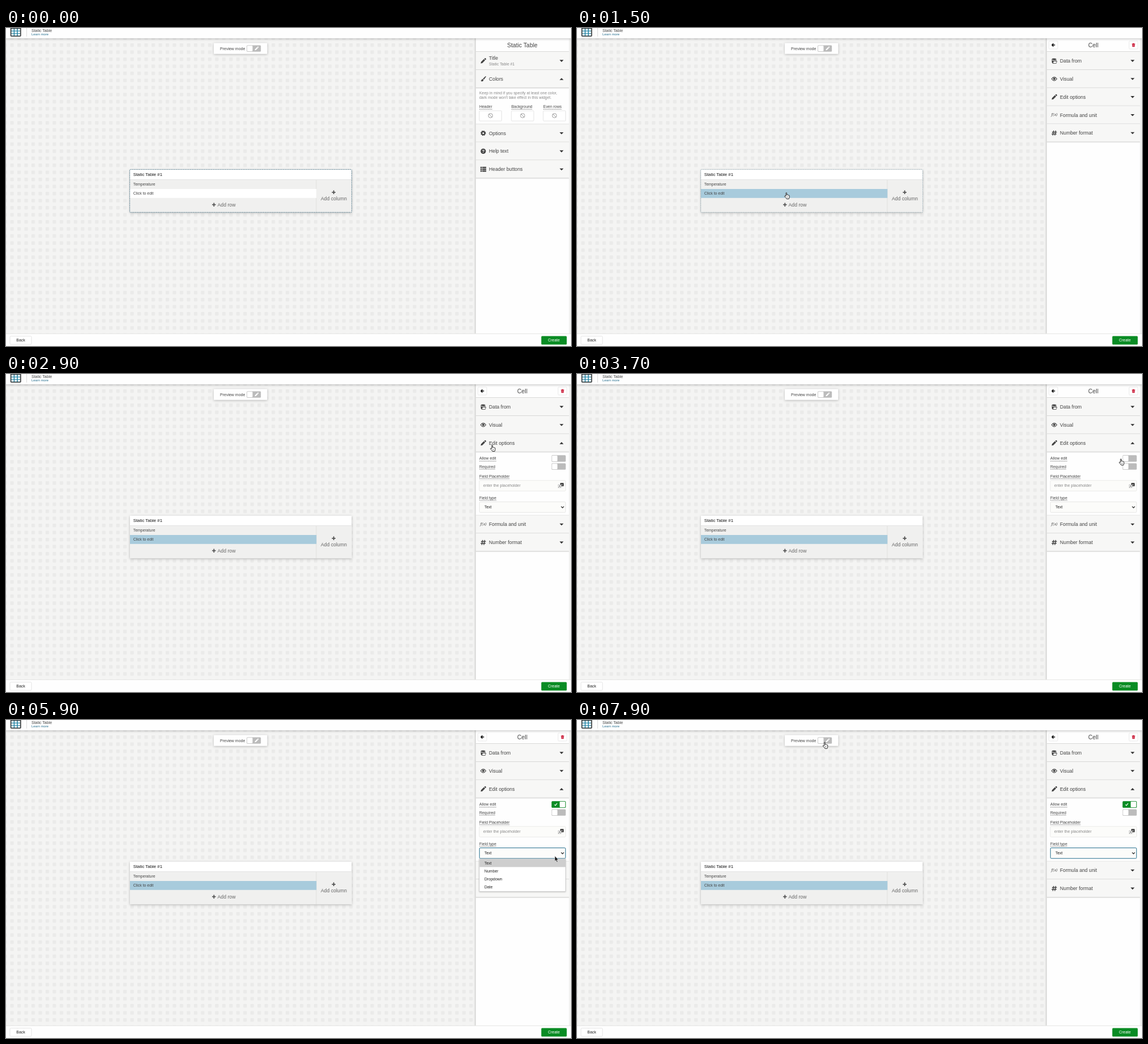
An HTML page that plays this animation: 998 px wide and 561 px high, repeating every 8 s.

```html
<!DOCTYPE html>
<html lang="en">
<head>
<meta charset="utf-8">
<title>Static Table editor</title>
<style>
  html, body { margin: 0; width: 100%; height: 100%; overflow: hidden; background: #fefefe; }
  svg { display: block; width: 998px; height: 561px; font-family: "Liberation Sans", Arial, sans-serif; }
  .lift { filter: drop-shadow(0 1px 2px rgba(0, 0, 0, .25)); }
  .soft { filter: drop-shadow(0 1px 1px rgba(0, 0, 0, .2)); }
</style>
</head>
<body>
<svg id="stage" viewBox="0 0 998 561" xmlns="http://www.w3.org/2000/svg"></svg>
<script>
const INK = '#444', GREEN = '#0a8c24', BLUE = '#246e8e', PANEL = '#f7f7f6', CELL = '#f0f0ef';
const SMALL = 6.95, MEDIUM = 8.73, SECTION = 31.85, TILE = 12.475;

const rect = (x, y, w, h, fill, extra = '') =>
  `<rect x="${x}" y="${y}" width="${w}" height="${h}" fill="${fill}" ${extra}/>`;
const text = (x, y, label, size = SMALL, fill = INK, extra = '') =>
  `<text x="${x}" y="${y}" font-size="${size}" fill="${fill}" ${extra}>${label}</text>`;
const path = (d, fill = INK, extra = '') => `<path d="${d}" fill="${fill}" ${extra}/>`;
const line = (d, color = INK, width = 1, extra = '') =>
  path(d, 'none', `stroke="${color}" stroke-width="${width}" ${extra}`);
const group = (id, body) => `<g id="${id}">${body}</g>`;
const at = (x, y, body) => `<g transform="translate(${x} ${y})">${body}</g>`;
const center = 'text-anchor="middle"';
const outlined = (color, radius = 1) => `stroke="${color}" stroke-width=".8" rx="${radius}"`;

// Icons are drawn around their own centre.
const pencil = color => path('M-4.5 4.5l.6-2.6 5-5 2.2 2.2-5 5zM1.8-3.7l1-1q.6-.4 1.2.1l.9.9q.5.6 0 1.2l-1 1z', color);
const plus = line('M-3.2 0H3.2M0-3.2V3.2', '#555', 1.8);
const icons = {
  pencil: pencil(INK),
  brush: path('M4.5-4.7q.7.3.2 1.2L1.2 1.2-.6-.3 3.5-4.4q.5-.5 1-.3zM-1.1.3L.6 1.8Q.3 4.6-2.3 4.4-4 4.4-4.6 2.7q1 .5 1.4-.5Q-2.6.3-1.1.3z'),
  gear: '<circle r="2.7" fill="none" stroke="#444" stroke-width="2.2"/>' +
    '<circle r="3.9" fill="none" stroke="#444" stroke-width="1.5" stroke-dasharray="1.6 1.463"/>',
  help: '<circle r="4.6" fill="#444"/>' + text(0, 2.9, '?', 8, '#fff', center + ' font-weight="bold"'),
  list: [-3.2, 0, 3.2].map(y => rect(-5, y - 1.2, 2.6, 2.4, INK) + rect(-1.7, y - 1.2, 6.9, 2.4, INK)).join(''),
  data: path('M-4.4-2.5q0-2 4-2t4.2 2v5q-.4 2-4 2t-4-2z') + line('M-4-1.5Q0 .8 4.8-1.8', PANEL, 1) +
    path('M-1.2.5h6L3.4 4.5h-6z', PANEL, 'stroke="#444" stroke-width=".8"'),
  eye: line('M-4.7 0Q0-6.4 4.7 0 0 6.4-4.7 0z', INK, 1.1) + '<circle r="2" fill="#444"/>',
  formula: text(-5.2, 2, 'ƒ(x)', 6.5, INK, 'font-style="italic" font-family="DejaVu Sans, sans-serif"'),
  hash: line('M-1-4.4L-2.6 4.4M2.6-4.4L1 4.4M-4-1.6H4.6M-4.6 1.6H4', INK, 1.4),
};

function section(y, icon, label, open = false, subtitle = '') {
  const mid = y + SECTION / 2, bottom = y + SECTION;
  return rect(830, y, 164.5, SECTION, PANEL) +
    line(`M830 ${bottom - .3}H994.5`, '#cacac9', .9) + line(`M830 ${bottom + .6}H994.5`, '#e9e9e8', .9) +
    at(843, mid, icons[icon]) +
    text(853, subtitle ? mid - 1.8 : mid + 3.1, label, MEDIUM) +
    (subtitle ? text(853, mid + 8, subtitle, SMALL, '#888') : '') +
    path(open ? `M977.8 ${mid + 2}h7l-3.5-3.6z` : `M977.8 ${mid - 1.6}h7l-3.5 3.6z`, '#333');
}
const sections = (y, ...rows) => rows.map((row, i) => section(y + i * SECTION, ...row)).join('');

const label = (x, y, name, width) => text(x, y, name) +
  line(`M${x} ${y + 2.3}h${width}`, '#555', .8, 'stroke-dasharray="1 .6"');

const toggleOff = (x, y) => rect(x, y, 25, 11.4, '#bbb', 'rx="1.5"') +
  rect(x + .7, y + .8, 9.6, 9.8, '#fff', 'rx="1.2"');

function colorField(x, name, width) {
  return label(x, 141, name, width) + rect(x, 146, 39.5, 18, '#fff', outlined('#ddd')) +
    at(x + 19.8, 154.6, '<circle r="3.8" fill="none" stroke="#999" stroke-width="1"/>' + line('M-2.7-2.7L2.7 2.7', '#999'));
}

const backdrop =
  `<defs><pattern id="dots" x="7.5" y="27" width="${TILE}" height="${TILE}" patternUnits="userSpaceOnUse">
    ${rect(0, 0, 6.2, 6.2, '#eaeae9', 'rx="1"')}</pattern>
   <linearGradient id="edge"><stop stop-color="#000" stop-opacity="0"/><stop offset="1" stop-color="#000" stop-opacity=".13"/></linearGradient></defs>` +
  rect(0, 0, 998, 561, '#f4f4f3') + rect(0, 18, 830, 522, 'url(#dots)') +
  rect(826, 18, 4, 522, 'url(#edge)') + rect(830, 18, 164.5, 522, '#fefefe') + rect(994.5, 18, 3.5, 522, '#f1f1f0');

const topBar = `<g class="lift">${rect(0, -6, 998, 24.2, '#fefefe')}</g>` +
  rect(7.7, -5, 19, 20.2, INK, 'rx="2"') + rect(9.6, 1.5, 15.2, 12, '#2585a5') +
  [9.6, 15.2, 20.8].map(x => [1.5, 5.9, 10.2].map(y => rect(x, y, 4, 3.2, '#fff')).join('')).join('') +
  line('M36.5 0V15', '#ddd') + text(45, 6.8, 'Static Table', 7) + text(45, 13.2, 'Learn more', 5.9, BLUE);

const previewBar = `<g class="lift">${rect(367, 26.5, 94.5, 19.3, '#fefefe', 'rx="1"')}</g>` +
  text(378, 38.6, 'Preview mode', 7) + toggleOff(425.2, 30.4) + at(442.6, 36.1, `<g transform="scale(.72)">${pencil('#fff')}</g>`);

const bottomBar = rect(0, 538.8, 998, 1.2, '#e8e8e7') + rect(0, 540, 998, 21, '#fefefe') +
  rect(7, 543.7, 38, 14.4, '#fff', outlined('#ddd', 1.5)) + text(26, 553, 'Back', 7, '#222', center) +
  rect(945.5, 543.5, 45, 15, GREEN, 'rx="1.5"') + text(967.7, 553, 'Create', 7, '#fff', center);

const table = `<g class="lift">${rect(219, 250, 391.5, 75, '#fff')}</g>` +
  rect(219, 267.5, 391.5, 57.5, CELL) + line('M219 267.6H610.5', '#dededd', .8) +
  line('M548 268V325', '#dcdcdb', .8) + rect(219, 284, 329.4, 15.8, '#fff', 'id="cell"') +
  text(224.7, 260.9, 'Static Table #1', 7.85, '#111') +
  text(224.7, 278.2, 'Temperature') + text(224.7, 294, 'Click to edit') +
  at(367.3, 311.7, plus) + text(373.5, 315, 'Add row', MEDIUM, '#666') +
  at(578.8, 289.8, plus) + text(579, 304.3, 'Add column', MEDIUM, '#666', center) +
  rect(218.6, 249.6, 392, 75.6, 'none', 'id="outline" stroke="#3a6a80" stroke-width=".8" stroke-dasharray="1.9 1.2" rx="1"');

const panelTitle = name => text(912, 33.8, name, 10.4, INK, center) + line('M830 41.6H994.5', '#d2d2d1', .9);

const widgetPanel = panelTitle('Static Table') +
  sections(42, ['pencil', 'Title', false, 'Static Table #1'], ['brush', 'Colors', true]) +
  text(836, 117.4, 'Keep in mind if you specify at least one color,', 6.88, '#888') +
  text(836, 125, "dark mode won't take effect in this widget.", 6.88, '#888') +
  colorField(836, 'Header', 23) + colorField(892.7, 'Background', 37) + colorField(949, 'Even rows', 32.5) +
  line('M830 169.4H994.5', '#d2d2d1', .9) +
  sections(169.6, ['gear', 'Options'], ['help', 'Help text'], ['list', 'Header buttons']);

const iconButton = (x, body) => rect(x, 23, 15.5, 14, '#fff', outlined('#e4e4e4', 1.5)) + at(x + 7.8, 30, body);
const cellPanel = panelTitle('Cell') +
  iconButton(833.6, line('M3 0H-2M.2-2.6L-2.4 0 .2 2.6', '#111', 1.5)) +
  iconButton(975.2, path('M-2.8-2.6h1.7l.4-.7h1.4l.4.7h1.7v1h-5.6zM-2.4-1.2h4.8L2.1 3.2h-4.2z', '#c8102e') +
    line('M-.8-.4V2.3M.8-.4V2.3', '#fff', .5)) +
  sections(42, ['data', 'Data from'], ['eye', 'Visual']);

const editY = 42 + 2 * SECTION;
const tail = [['formula', 'Formula and unit'], ['hash', 'Number format']];
const closedOptions = sections(editY, ['pencil', 'Edit options'], ...tail);
const openOptions = section(editY, 'pencil', 'Edit options', true) +
  label(836, 151.4, 'Allow edit', 30) + label(836, 165.6, 'Required', 28) +
  toggleOff(963.7, 143.3) + toggleOff(963.7, 157.4) +
  group('allowed', rect(963.7, 143.3, 25, 11.4, GREEN, 'rx="1.5"') +
    line('M968.8 149.2l1.6 1.7 3-3.8', '#fff', 1.2) + rect(978, 144.1, 9.8, 9.8, '#fff', 'rx="1.2"')) +
  label(836, 182.5, 'Field Placeholder', 53.5) +
  rect(836, 187.8, 152.5, 18.6, '#fcfcfa', outlined('#e6e6e5', 1.5)) + text(843, 199.4, 'enter the placeholder', 7, '#888') +
  rect(979, 192.3, 6, 5.6, '#333', 'rx=".6"') + text(982, 196.9, 'a', 5, '#fff', center) +
  rect(975.2, 195.4, 5.2, 5.4, '#fff', 'stroke="#999" stroke-width=".5"') + text(977.8, 200, 'A', 5, '#333', center) +
  label(836, 220.5, 'Field type', 30.5) +
  rect(836.3, 225.6, 152, 18.6, '#fcfcfa', 'id="select" stroke-width="1" rx="1.5"') +
  text(845, 237.3, 'Text', SMALL, '#222') + line('M980.6 233.6l2.4 2.5 2.4-2.5', '#222', 1.3) +
  line('M830 249.3H994.5', '#d2d2d1', .9) + sections(249.4, ...tail);

const options = ['Text', 'Number', 'Dropdown', 'Date'];
const popup = `<g class="soft">${rect(836, 245, 152.5, 57.5, '#fff', 'stroke="#bbb" stroke-width=".6"')}</g>` +
  rect(836.4, 245.4, 151.8, 14, '#cecece') +
  options.map((name, i) => text(845, 254.8 + i * 14.2, name, SMALL, '#222')).join('');

const arrow = path('M.6.2V9.6L2.7 7.7 4.2 11.3 5.8 10.6 4.3 7.2H7.1z', '#111', 'stroke="#fff" stroke-width=".6"');
const hand = path('M3 6.8V1.4Q3 .5 3.8.5t.8.9V4.6q.9-.6 1.5.1.9-.5 1.4.3 1.6-.3 1.6 1.2V8.3Q9 10 8.2 11.5H4.3Q3.6 9.8 1 7.5.3 6.5 1.2 6.1 2 5.8 3 6.8z',
  '#fff', 'stroke="#111" stroke-width=".9" stroke-linejoin="round"') + line('M4.9 7.2V9.5M6.3 7.2V9.5', '#333', .5);

const stage = document.getElementById('stage');
stage.innerHTML = backdrop + topBar + previewBar + table +
  group('widgetPanel', widgetPanel) +
  group('cellPanel', cellPanel + group('closedOptions', closedOptions) + group('openOptions', openOptions)) +
  bottomBar + group('popup', popup) +
  group('cursor', group('arrow', arrow) + group('hand', hand));

const el = id => document.getElementById(id);
const show = (id, visible) => el(id).setAttribute('display', visible ? 'inline' : 'none');
const between = (t, from, to) => t >= from && t < to;

// Pointer stops: time, x, y
const stops = [
  [400, 168, 48], [500, 168, 48], [1000, 366, 290], [1700, 366, 290],
  [2300, 797, 162.5], [2400, 797, 162.5], [2800, 855, 125], [3100, 855, 125],
  [3700, 957, 149.3], [3800, 964, 152], [4000, 972, 149], [4100, 972, 149],
  [4600, 915.5, 225], [4700, 913.5, 232], [4800, 913.5, 232], [5100, 980, 238], [5800, 980, 238],
  [6200, 908, 248], [6400, 908, 248], [6500, 908.5, 247], [6700, 691, 169], [6800, 691, 169],
  [7100, 525, 103], [7200, 525, 103], [7500, 466, 62], [7600, 466, 62], [7900, 433.7, 38.8],
];

function pointer(t) {
  const next = stops.findIndex(stop => stop[0] > t);
  if (next < 1) return (next < 0 ? stops[stops.length - 1] : stops[0]).slice(1);
  const [t0, x0, y0] = stops[next - 1], [t1, x1, y1] = stops[next];
  const p = (t - t0) / (t1 - t0), eased = p * p * (3 - 2 * p);
  return [x0 + (x1 - x0) * eased, y0 + (y1 - y0) * eased];
}

function render(t) {
  const [x, y] = pointer(t);
  const pointing = between(t, 900, 1900) || between(t, 2600, 4200) || t >= 7800;
  show('cursor', t >= 400);
  show('hand', pointing);
  show('arrow', !pointing);
  el('cursor').setAttribute('transform', `translate(${x} ${y})`);

  el('cell').setAttribute('fill', t >= 1400 ? '#a8cbdc' : t >= 900 ? '#d4e5eb' : '#fff');
  show('outline', t < 1400 || (t < 2300 && x < 610));
  el('outline').setAttribute('stroke-opacity', t < 1400 ? 1 : .45);

  show('widgetPanel', t < 1500);
  show('cellPanel', t >= 1500);
  show('closedOptions', t < 2900);
  show('openOptions', t >= 2900);
  show('allowed', t >= 4000);
  show('popup', between(t, 5000, 6500));
  el('select').setAttribute('stroke', t >= 5000 ? BLUE : '#e6e6e5');
}

// The picture advances ten times a second.
function tick() {
  render(Math.floor(performance.now() % 8000 / 100) * 100);
  requestAnimationFrame(tick);
}
tick();
</script>
</body>
</html>
```
